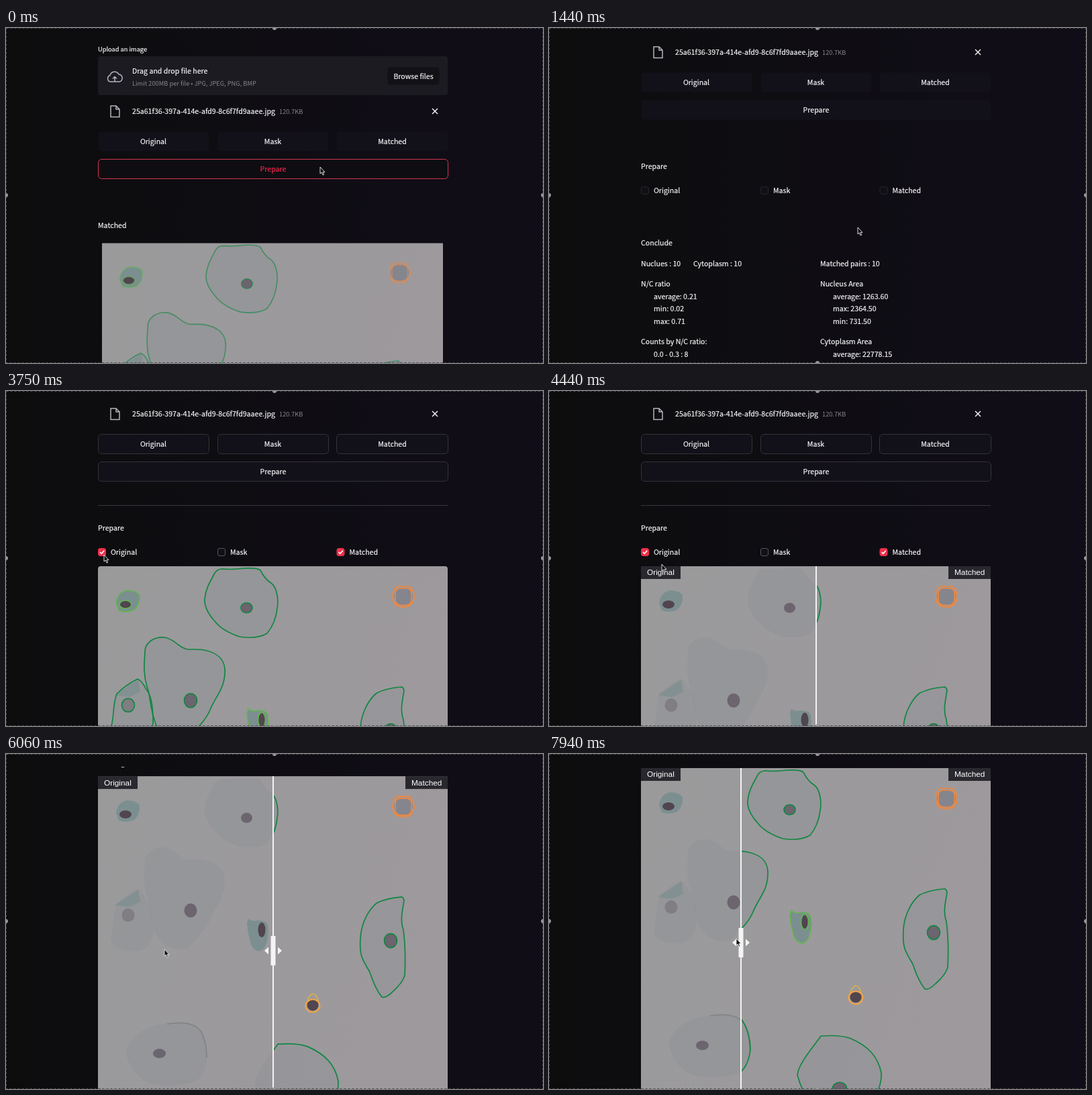
Write an HTML page that moves like this. It is 800 px wide and 499 px high and loops after 8000 ms.

```html
<!DOCTYPE html>
<html lang="en">
<head>
<meta charset="utf-8">
<title>Cell matching app</title>
<style>
html, body { margin: 0; width: 100%; height: 100%; overflow: hidden; background: #0d0c10; }
svg { display: block; width: 100vw; height: 100vh; }
text { font: 10.6px "Noto Sans CJK JP", "Noto Sans CJK SC", "Noto Sans CJK", "Noto Sans", sans-serif; fill: #f2f2f4; stroke: #f2f2f4; stroke-width: .22; white-space: pre; transform: translateY(.4px); }
.small { font-size: 9.28px; }
.gray { fill: #85858c; stroke: none; }
.mid { text-anchor: middle; }
.tag { font: 11.84px "Liberation Sans", Arial, sans-serif; fill: #fff; stroke: none; }
.btn { fill: #121119; stroke: #34333c; }
.rule { stroke: #36353d; }
.icon { fill: none; stroke: #b4b4bc; stroke-width: 1.5; }
.box { fill: #111017; stroke: #56555e; }
.checked .box { fill: #ee2f4b; stroke: #ee2f4b; }
.tick { display: none; fill: none; stroke: #fff; stroke-width: 1.7; }
.checked .tick { display: inline; }
.flat .btn, .flat .rule { stroke: none; }
.flat .box { stroke: #26252c; }
.flat .hot .btn { fill: #0e0d11; stroke: #d23650; }
.hot text { fill: #e6264c; stroke: #e6264c; }
.body { fill: #7f8a8c; fill-opacity: .22; }
.teal { fill: #718b8d; fill-opacity: .72; }
.nucleus { fill: #6c646e; }
.dark { fill: #51454f; }
#marks { fill: none; stroke: #118642; stroke-width: 1.7; }
</style>
</head>
<body>
<svg viewBox="0 0 800 499">
  <defs>
    <linearGradient id="bg" gradientUnits="userSpaceOnUse" x1="0" y1="0" x2="800" y2="0">
      <stop offset="0" stop-color="#0c0c0d"/>
      <stop offset=".35" stop-color="#0e0d11"/>
      <stop offset="1" stop-color="#110d18"/>
    </linearGradient>
    <linearGradient id="glass" x2="1" y2=".3">
      <stop offset="0" stop-color="#9a9a9b"/>
      <stop offset="1" stop-color="#9d999d"/>
    </linearGradient>
    <clipPath id="right"><rect id="rightRect" y="21" width="521" height="521"/></clipPath>
    <clipPath id="round"><rect x="137" y="21" width="521" height="521" rx="4"/></clipPath>

    <path id="cA" d="M322 25Q334 26 345 25Q372 22 379 27Q386 41 395 46C405 54 406 74 404 84C402 102 394 115 389 121Q374 130 348 126C330 120 318 112 311 103Q295 85 296 70C297 54 306 41 311 31Q315 25 322 25Z"/>
    <path id="cB" d="M207 150C206 135 220 126 236 127C252 129 258 144 272 145Q290 144 300 147C320 152 327 165 326 180C325 205 312 215 304 235C298 250 285 262 272 276C255 285 235 275 224 258C214 235 216 215 210 200C204 180 206 165 207 150Z"/>
    <path id="cC" d="M196 189C188 193 176 200 165 211C158 230 162 245 156 262C156 275 170 282 195 282C215 278 220 265 219 245C218 220 214 210 208 203Q203 192 196 189Z"/>
    <path id="cD" d="M164 76Q166 60 180 57Q194 57 199 64Q200 78 191 86Q180 91 168 87Z"/>
    <path id="cE" d="M361 233Q366 238 374 236Q388 235 390 243Q392 258 388 270Q385 281 376 282Q366 279 364 268Q360 255 359 240Z"/>
    <path id="cG" d="M587 201Q592 200 593 206C590 225 587 235 592 250Q596 280 594 318Q590 330 576 342Q566 352 560 350Q550 338 542 313C532 295 526 290 528 262C529 240 540 220 552 210Q566 203 587 201Z"/>
    <path id="cI" d="M178 430C185 410 205 393 235 390C260 386 280 389 288 397Q300 415 300 440C298 460 290 470 286 473C270 482 240 484 220 480C200 476 182 455 178 430Z"/>
    <path id="cJ" d="M405 420Q435 418 450 424C475 435 490 450 495 475C496 500 480 530 440 540C400 540 378 510 370 478C372 460 395 435 405 420Z"/>
    <ellipse id="nA" cx="358.500" cy="83" rx="8.500" ry="7.500"/>
    <ellipse id="nB" cx="275" cy="221" rx="9.500" ry="10.500"/>
    <ellipse id="nC" cx="182" cy="228" rx="9.500" ry="10"/>
    <ellipse id="nD" cx="178" cy="78" rx="9" ry="6"/>
    <ellipse id="nE" cx="381" cy="250" rx="5.500" ry="11"/>
    <ellipse id="nG" cx="573" cy="266" rx="9.500" ry="10.500"/>
    <ellipse id="nI" cx="228.500" cy="434" rx="9.500" ry="7"/>
    <ellipse id="nJ" cx="433" cy="498" rx="10.500" ry="9"/>

    <g id="photo">
      <rect x="137" y="21" width="521" height="521" fill="url(#glass)"/>
      <g class="body">
        <use href="#cA"/><use href="#cB"/><use href="#cC"/><use href="#cG"/><use href="#cI"/><use href="#cJ"/>
      </g>
      <path d="M240 390Q279 384 291 402Q299 418 299 440" fill="none" stroke="#777b7e" stroke-width="2" opacity=".6"/>
      <path d="M162 213L197 190L200 208L184 216Z" class="teal" opacity=".7"/>
      <g class="teal"><use href="#cD"/><use href="#cE"/></g>
      <ellipse cx="592" cy="66" rx="14" ry="13" fill="#85858e"/>
      <g class="nucleus">
        <use href="#nA"/><use href="#nB"/><use href="#nG"/><use href="#nI"/><use href="#nJ"/>
        <use href="#nC" opacity=".5"/>
      </g>
      <g class="dark">
        <use href="#nD"/><use href="#nE"/><circle cx="457" cy="362" r="8.500"/>
      </g>
    </g>

    <g id="marks">
      <use href="#cA"/><use href="#cB"/><use href="#cC"/><use href="#cG"/><use href="#cI"/><use href="#cJ"/>
      <use href="#nA"/><use href="#nB"/><use href="#nC"/><use href="#nG"/><use href="#nI"/><use href="#nJ"/>
      <g stroke="#62b64f">
        <use href="#cD"/><use href="#cE"/><use href="#nD"/><use href="#nE"/>
      </g>
      <g stroke="#f0873c">
        <path d="M582 51H601Q609 58 608 69Q605 81 594 82Q580 82 577 73Q574 59 582 51Z"/>
        <rect x="580" y="54" width="24" height="25" rx="7"/>
      </g>
      <path d="M449 356Q452 346 457 345Q463 346 465 356" stroke="#dcb04a"/>
      <ellipse cx="457" cy="363" rx="10.500" ry="9.500" stroke="#f3a53f" stroke-width="2"/>
    </g>
  </defs>

  <rect width="800" height="499" fill="url(#bg)"/>

  <g id="page">
    <text class="small" x="137" y="-55.500">Upload an image</text>
    <rect x="137" y="-48" width="521" height="58" rx="4" fill="#1b1b21"/>
    <path class="icon" d="M155 -10a5 5 0 0 1 0 -9.500a7 7 0 0 1 13 -1.500a5.600 5.600 0 0 1 1 11ZM162 -9.500V-17M159 -14.500L162 -17.500L165 -14.500"/>
    <text x="188" y="-22">Drag and drop file here</text>
    <text class="small gray" x="188" y="-4">Limit 200MB per file • JPG, JPEG, PNG, BMP</text>
    <rect x="568.500" y="-31.500" width="77" height="26" rx="4" fill="#111116"/>
    <text class="mid" x="607" y="-14.500">Browse files</text>

    <path class="icon" d="M156 26H164L169 31V42.500H156ZM164 26V31H169"/>
    <text x="188" y="37.500">25a61f36-397a-414e-afd9-8c6f7fd9aaee.jpg</text>
    <text class="small gray" x="407" y="37.500">120.7KB</text>
    <path d="M635 30L643 38M643 30L635 38" stroke="#f0f0f2" stroke-width="1.500"/>

    <rect class="btn" x="137.500" y="64.500" width="165" height="29" rx="5"/>
    <rect class="btn" x="315.500" y="64.500" width="165" height="29" rx="5"/>
    <rect class="btn" x="492.500" y="64.500" width="166" height="29" rx="5"/>
    <text class="mid" x="219.500" y="82.500">Original</text>
    <text class="mid" x="397.500" y="82.500">Mask</text>
    <text class="mid" x="575.500" y="82.500">Matched</text>
    <g id="prepare">
      <rect class="btn" x="137.500" y="105.500" width="521" height="29" rx="5"/>
      <text class="mid" x="398" y="124">Prepare</text>
    </g>
    <path class="rule" d="M137 170.500H658"/>
    <text id="heading" x="137" y="208"></text>

    <g id="preview" transform="translate(143 230.500) scale(.975) translate(-137 -21)">
      <use href="#photo"/><use href="#marks" opacity=".6"/>
    </g>

    <g id="options">
      <g id="optOriginal" transform="translate(137 234)"></g>
      <g id="optMask" transform="translate(315 234)"></g>
      <g id="optMatched" transform="translate(492.500 234)"></g>
    </g>

    <g id="results">
      <text x="137" y="322">Conclude</text>
      <text x="137" y="352.500">Nuclues : 10</text>
      <text x="215" y="352.500">Cytoplasm : 10</text>
      <text x="404" y="352.500">Matched pairs : 10</text>
      <text x="137" y="383">N/C ratio</text>
      <text x="156" y="401.500">average: 0.21</text>
      <text x="156" y="420">min: 0.02</text>
      <text x="156" y="438.500">max: 0.71</text>
      <text x="404" y="383">Nucleus Area</text>
      <text x="423" y="401.500">average: 1263.60</text>
      <text x="423" y="420">max: 2364.50</text>
      <text x="423" y="438.500">min: 731.50</text>
      <text x="137" y="469">Counts by N/C ratio:</text>
      <text x="156" y="487.500">0.0 - 0.3 : 8</text>
      <text x="404" y="469">Cytoplasm Area</text>
      <text x="423" y="487.500">average: 22778.15</text>
    </g>

    <g id="matched" transform="translate(0 240)" clip-path="url(#round)">
      <use href="#photo"/><use href="#marks"/>
    </g>

    <g id="compare" transform="translate(0 240)">
      <use href="#photo"/>
      <g clip-path="url(#right)"><use href="#marks"/></g>
      <rect x="137" y="21" width="59" height="19" fill="#29282f"/>
      <rect x="595" y="21" width="63" height="19" fill="#29282f"/>
      <text class="tag" x="146" y="34">Original</text>
      <text class="tag" x="604" y="34">Matched</text>
      <g id="slider" fill="#f4f4f4">
        <rect x="-1" y="21" width="2" height="521"/>
        <rect x="-3.500" y="259" width="7" height="44" rx="1"/>
        <path d="M-13 281L-7 275.500V286.500ZM13 281L7 275.500V286.500Z"/>
      </g>
    </g>
  </g>

  <rect width="800" height="19" fill="url(#bg)"/>
  <rect x=".5" y=".5" width="799" height="498" fill="none" stroke="#4c4c50" stroke-dasharray="3 3"/>
  <g fill="#98989c">
    <circle cx="400" r="3"/><circle cx="400" cy="499" r="3"/>
    <circle cy="249" r="3"/><circle cx="800" cy="249" r="3"/>
  </g>
  <path id="cursor" d="M0 0V10L2.300 8L4 12L5.700 11.300L4 7.600H7Z" fill="#0a0a0a" stroke="#eee" stroke-width=".9"/>
</svg>
<script>
const LOOP = 8000;
const $ = id => document.getElementById(id);
const clamp = u => Math.min(1, Math.max(0, u));
const ease = u => u * u * (3 - 2 * u);
const show = (id, on) => $(id).style.display = on ? '' : 'none';

// Cursor moves: start, end, x, y
const moves = [
  [0, 0, 468, 207],
  [500, 810, 460, 297],
  [1690, 2310, 501, 244],
  [3330, 3540, 146, 244],
  [4000, 4400, 168, 258],
  [4450, 4690, 236, 291],
  [6630, 7310, 391, 275],
  [7630, 7940, 279, 275]
];

for (const name of ['Original', 'Mask', 'Matched'])
  $('opt' + name).innerHTML = `<rect class="box" x=".5" y=".5" width="11" height="11" rx="2.5"/>
    <path class="tick" d="M3 6L5.200 8.300L9.300 3.700"/><text x="19" y="10">${name}</text>`;

function cursorAt(t) {
  let x = 0, y = 0;
  for (const [from, to, tx, ty] of moves) {
    if (t < from) break;
    const u = to > from ? ease(clamp((t - from) / (to - from))) : 1;
    x += (tx - x) * u;
    y += (ty - y) * u;
  }
  return [x, y];
}

function scrollAt(t) {
  if (t < 5000) return 90 * (1 - clamp((t - 880) / 780)) ** 3;
  const s = (t - 5000) / 1000;
  return 240 * (Math.exp(-2.55 * s - .25 * s * s) - 1);
}

function draw(t) {
  const prepared = t >= 250;
  const split = 398 - 112 * ease(clamp((t - 7630) / 310));
  $('page').setAttribute('transform', `translate(0 ${scrollAt(t)})`);
  $('cursor').setAttribute('transform', `translate(${cursorAt(t)})`);
  $('slider').setAttribute('transform', `translate(${split} 0)`);
  $('rightRect').setAttribute('x', split);
  $('heading').textContent = prepared ? 'Prepare' : 'Matched';
  $('page').classList.toggle('flat', t < 1690);
  $('prepare').classList.toggle('hot', t < 560);
  $('optMatched').classList.toggle('checked', t >= 2310);
  $('optOriginal').classList.toggle('checked', t >= 3690);
  show('preview', !prepared);
  show('options', prepared);
  show('results', prepared && t < 2560);
  show('matched', t >= 2560 && t < 4000);
  show('compare', t >= 4000);
}

const start = performance.now();
function tick() {
  draw((performance.now() - start) % LOOP);
  requestAnimationFrame(tick);
}
tick();
</script>
</body>
</html>
```
